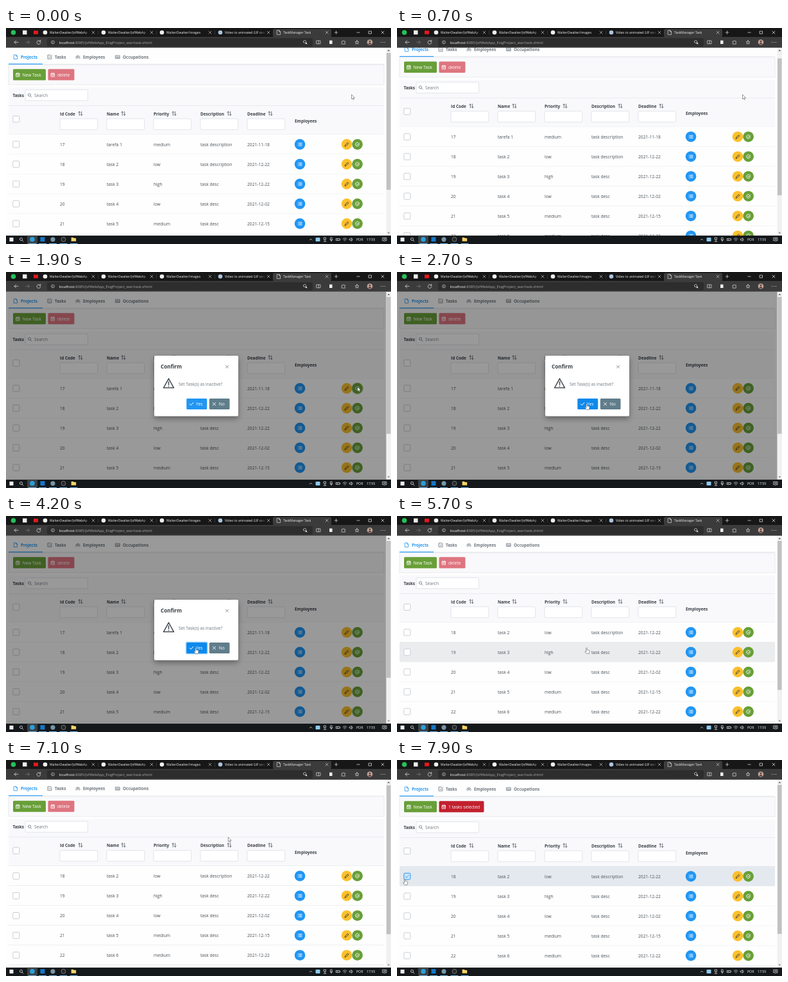
These frames come from a looping animation (600x338 px, 8 s). An HTML page:

```html
<!DOCTYPE html>
<html lang="en">
<head>
<meta charset="utf-8">
<title>Task table</title>
<style>
  html, body { margin: 0; width: 100%; height: 100%; overflow: hidden; background: #fff; }
  svg { display: block; width: 100vw; height: 100vh; }
  text { font-family: "Open Sans", "Noto Sans", sans-serif; white-space: pre; }
</style>
</head>
<body>
<svg viewBox="0 0 600 338" xmlns="http://www.w3.org/2000/svg">
  <defs>
    <linearGradient id="fade"><stop stop-color="#171717" stop-opacity="0"/><stop offset="1" stop-color="#171717"/></linearGradient>
    <filter id="shadow" x="-20%" y="-20%" width="140%" height="150%"><feDropShadow dx="0" dy="4" stdDeviation="4" flood-opacity=".35"/></filter>
  </defs>
  <g id="page"></g>
  <g id="chrome"></g>
  <g id="pointer"></g>
</svg>
<script>
const LOOP = 8000, STEP = 100;
const TOP = 30.8, BOTTOM = 324.8, ROW_TOP = 166.5, ROW_H = 31;
const INK = '#495057', DARK = '#383e44', MUTED = '#6c757d', LINE = '#e3e6ea', PANEL = '#f9f9fb';
const BLUE = '#2196f3', GREEN = '#689f38', AMBER = '#fbc02d';
const COLUMNS = [84, 157, 230, 303, 376];
const TASKS = [
  ['17', 'tarefa 1', 'medium', 'task description', '2021-11-18'],
  ['18', 'task 2', 'low', 'task description', '2021-12-22'],
  ['19', 'task 3', 'high', 'task desc', '2021-12-22'],
  ['20', 'task 4', 'low', 'task desc', '2021-12-02'],
  ['21', 'task 5', 'medium', 'task desc', '2021-12-15'],
  ['22', 'task 6', 'medium', 'task desc', '2021-12-22']
];

// SVG helpers
const rect = (x, y, w, h, fill, extra = '') =>
  `<rect x="${x}" y="${y}" width="${w}" height="${h}" fill="${fill}" ${extra}/>`;
const circle = (x, y, r, fill, extra = '') =>
  `<circle cx="${x}" cy="${y}" r="${r}" fill="${fill}" ${extra}/>`;
const text = (s, x, y, fill = INK, size = 6.7, extra = '') =>
  `<text x="${x}" y="${y}" fill="${fill}" font-size="${size}" ${extra}>${s}</text>`;
const bold = (s, x, y, fill = DARK, size = 6.45) => text(s, x, y, fill, size, 'font-weight="700"');
const icon = (d, x, y, color, width = .8, fill = 'none') =>
  `<path transform="translate(${x} ${y})" d="${d}" fill="${fill}" stroke="${color}" stroke-width="${width}" stroke-linecap="round" stroke-linejoin="round"/>`;
const input = (x, y, w, h) => rect(x, y, w, h, '#fff', 'rx="1.3" stroke="#ced4da" stroke-width=".6"');
const checkbox = y => rect(10.8, y - 5, 10, 10, '#fff', 'rx="1.3" stroke="#c3c9cf" stroke-width=".9"');

const ICONS = {
  file: 'M-2.4-3.3H.8L2.6-1.4V3.3H-2.4ZM.6-3.2V-1.2H2.5',
  checkBox: 'M3-.3V3H-3V-3H1.5M-1.5-.4L0 1.2 3.4-2.7',
  people: 'M-1.2-1A1.2 1.2 0 1 0 1.2-1 1.2 1.2 0 1 0-1.2-1M-2.3 2.7Q-2 .9 0 .9T2.3 2.7M-2.2-1.5Q-3.4-1-2.6.2L-3.5 1.6M2.2-1.5Q3.4-1 2.6.2L3.5 1.6',
  card: 'M-3.2-2.2H3.2V2.4H-3.2ZM-2-.4H-.3M-2 1H-.3M1-.3H2M.8 1.1H2.3',
  calendar: 'M-2.5-2H2.5V3H-2.5ZM-2.5-.4H2.5M-1.3-3V-1.5M1.3-3V-1.5M-1 1.4H1',
  search: 'M-2.6-.5A2.1 2.1 0 1 0 1.6-.5 2.1 2.1 0 1 0-2.6-.5M1 1.1L3 3.1',
  sort: 'M-1.7 3V-3M-3.2-1.5L-1.7-3-.2-1.5M1.7-3V3M.2 1.5L1.7 3 3.2 1.5',
  list: 'M-1.3-2H3M-1.3 0H3M-1.3 2H3M-2.9-2h.1M-2.9 0h.1M-2.9 2h.1',
  pencil: 'M-2.8 2.8L-2.2.8 1.5-2.9 2.9-1.5-.8 2.2Z',
  tick: 'M-2.8 0L-.8 2 2.9-2.2',
  checkCircle: 'M2.8-.2A2.9 2.9 0 1 1 1.2-2.6M-1.2-.3L.1 1 3-2.2',
  cross: 'M-2-2L2 2M2-2L-2 2',
  warning: 'M0-7.5L8 7H-8ZM0-2.5V2.2M0 4.4V4.6',
  left: 'M1-2L-1 0 1 2',
  right: 'M-1-2L1 0-1 2',
  star: 'M0-3L.9-.9 3-.8 1.4.6 1.9 2.8 0 1.6-1.9 2.8-1.4.6-3-.8-.9-.9Z',
  arrow: 'M0 0V6.6L1.6 5.3 2.7 7.7 3.7 7.3 2.7 4.9H4.7Z',
  hand: 'M-.7 .6Q0-.4.7 .6V3.4L3.8 4.2Q4.9 4.6 4.6 6L3.9 9.4H-.3L-2.6 6.2Q-2.6 5-.7 6.2Z'
};

// Motion
const easeOut = p => 1 - (1 - p) ** 2;
const easeInOut = p => p * p * (3 - 2 * p);
function track(keys, t, ease) {
  const next = keys.findIndex(k => k[0] > t);
  if (next === 0) return keys[0].slice(1);
  if (next < 0) return keys.at(-1).slice(1);
  const a = keys[next - 1], b = keys[next];
  const p = ease((t - a[0]) / (b[0] - a[0]));
  return a.slice(1).map((v, i) => v + (b[i + 1] - v) * p);
}
const SCROLL = [[50, 0], [350, 86.3], [420, 86.3], [865, 0], [6200, 0], [6560, 55.3], [6680, 55.3], [7150, 0]];
const POINTER = [[950, 538.5, 104.5], [1500, 548, 180], [1900, 548, 180], [2700, 295.5, 206],
  [5700, 295.5, 206], [6300, 398.5, 111], [6950, 398.5, 111], [7600, 12, 186]];
const DIALOG_OPEN = 1700, YES_CLICK = 4000, DIALOG_CLOSE = 5700, SELECT = 7800;

function tabMenu() {
  const tabs = [['Projects', 'file', 15, 23], ['Tasks', 'checkBox', 68, 76],
    ['Employees', 'people', 112, 120], ['Occupations', 'card', 174, 182]];
  return rect(4, 56.2, 585, .8, LINE) + rect(4, 55.8, 53, 1.2, BLUE) + tabs.map(([label, name, ix, x], i) => {
    const color = i ? MUTED : BLUE;
    return icon(ICONS[name], ix, 45.3, color) + bold(label, x, 47.8, color);
  }).join('');
}

function toolbar(selected) {
  const button = (x, w, fill, label) => rect(x, 64.3, w, 17.5, fill, 'rx="1.5"') +
    icon(ICONS.calendar, x + 7.5, 73.1, '#fff') + text(label, x + 14.5, 75.7, '#fff');
  return rect(4, 57.8, 585, 31, PANEL, `stroke="${LINE}" stroke-width=".8"`) +
    button(11, 51, GREEN, 'New Task') +
    (selected ? button(65.5, 70, '#c2202e', '1 tasks selected') : button(65.5, 41, '#de7580', 'delete'));
}

function tableHead() {
  const heads = [['Id Code', 116], ['Name', 183], ['Priority', 262], ['Description', 348], ['Deadline', 412]];
  return rect(4, 93, 585, 73.5, PANEL) + rect(4, 121, 585, .7, LINE) + rect(4, 166, 585, .7, LINE) +
    bold('Tasks', 10.5, 107.7) +
    input(30, 96.7, 97.5, 17) + icon(ICONS.search, 37, 105.2, MUTED) + text('Search', 44, 107.7, MUTED) +
    checkbox(142.5) +
    heads.map(([label, x], i) => bold(label, COLUMNS[i], 136.6) +
      icon(ICONS.sort, x, 133.8, INK) + input(COLUMNS[i], 142, 58.7, 17)).join('') +
    bold('Employees', 450, 147.6);
}

function tableRow(task, index, hovered, selected, focused) {
  const top = ROW_TOP + index * ROW_H, y = top + 15.6;
  const fill = selected ? '#e4e9ef' : hovered ? '#ebecee' : '#fefefe';
  const round = (x, color, name, ink) => circle(x, y, 8.3, color) + icon(ICONS[name], x, y, ink, .9);
  return rect(4, top, 585, ROW_H, fill) + rect(4, top + ROW_H - .6, 585, .7, LINE) +
    (selected
      ? rect(10.8, y - 5, 10, 10, '#cfe6fb', `rx="1.3" stroke="${BLUE}"`) + icon(ICONS.tick, 15.8, y, BLUE)
      : checkbox(y)) +
    task.map((s, i) => text(s, COLUMNS[i], y + 2.5)).join('') +
    (focused ? circle(547.6, y, 9.4, '#c5dfa8') : '') +
    round(458, BLUE, 'list', '#fff') + round(531, AMBER, 'pencil', '#333') + round(547.6, GREEN, 'checkCircle', '#fff');
}

function tableFoot(count) {
  const end = ROW_TOP + count * ROW_H, y = end + 15.5;
  const chevrons = [['left', 258.5], ['left', 262], ['left', 278], ['right', 314], ['right', 330.5], ['right', 334]];
  return rect(288.3, y - 8.3, 16.2, 16.6, '#e3f2fd', 'rx="1.3"') +
    text('1', 296.4, y + 2.5, INK, 6.7, 'text-anchor="middle"') +
    chevrons.map(([name, x]) => icon(ICONS[name], x, y, MUTED, .7)).join('') +
    rect(4, end + 29.5, 585, 27, PANEL, `stroke="${LINE}" stroke-width=".7"`) +
    bold(`In total there are ${count} tasks.`, 10.5, end + 45.7, DARK, 6.3);
}

function scrollbar(scroll, count) {
  const view = BOTTOM - TOP, height = view + 55.3 + (count - 5) * ROW_H, scale = 277 / height;
  return rect(592.5, TOP, 7.5, view, '#f1f1f1') +
    rect(593, 39 + scroll * scale, 6.5, view * scale, '#c1c1c1') +
    icon('M-1.6 .9L0-.9 1.6 .9Z', 596.3, 35, '#555', .2, '#555') +
    icon('M-1.6-.9L0 .9 1.6-.9Z', 596.3, 320.8, '#777', .2, '#777');
}

function dialog(opacity, hover, focus) {
  return rect(0, TOP, 592.5, BOTTOM - TOP, '#000', 'opacity=".4"') + `<g opacity="${opacity}">` +
    rect(231, 131, 131, 94.5, '#fff', 'rx="2" filter="url(#shadow)"') +
    bold('Confirm', 241, 151, DARK, 8.2) + icon(ICONS.cross, 344.5, 148.3, MUTED) +
    icon(ICONS.warning, 253.5, 174.3, INK, 1.6) +
    text('Set Task(s) as inactive?', 269, 177.6, MUTED, 6.6) +
    (focus ? rect(279.8, 196.4, 34.9, 20.2, '#a6d5fa', 'rx="2.5"') : '') +
    rect(281.3, 197.9, 31.9, 17.2, hover ? '#0d89ec' : BLUE, 'rx="1.5"') +
    icon(ICONS.tick, 289, 206.5, '#fff', 1) + text('Yes', 296, 209, '#fff') +
    rect(316.8, 197.9, 31.7, 17.2, '#607d8b', 'rx="1.5"') +
    icon(ICONS.cross, 324.5, 206.5, '#fff', 1) + text('No', 331.8, 209, '#fff') + '</g>';
}

function browserTabs() {
  const repo = 'WalterOwalter/';
  const titles = [repo + 'JsfWebAp', repo + 'JsfWebAp', repo + 'images', 'Video to animated GIF con', 'TaskManager Task'];
  return rect(0, 0, 600, 14, '#171717') + rect(416, 1.5, 91, 13, '#3b3b3b', 'rx="2"') +
    circle(11.5, 7, 3.8, '#25c15a') + rect(26, 3.7, 6.5, 6.5, '#eee') + rect(43, 4.2, 7, 5.5, '#e8171f') +
    titles.map((title, i) => {
      const x = 61 + 91 * i, active = i === 4;
      const mark = active ? icon(ICONS.file, x, 7, '#ddd', .7)
        : circle(x, 7, 3.3, i === 3 ? '#a9c4dc' : '#f2f2f2');
      return mark + text(title, x + 7, 9, '#f0f0f0', 5.1) +
        (active ? '' : rect(x + 60, 2, 12, 11, 'url(#fade)') + rect(x + 72, 2, 10, 11, '#171717') + rect(x + 82, 4, .5, 6.5, '#555')) +
        icon(ICONS.cross, x + 75, 7, '#ddd', .6);
    }).join('') +
    icon('M-2.4 0H2.4M0-2.4V2.4', 514.5, 7, '#ddd', .7) +
    icon('M-2.2 0H2.2', 549, 7, '#eee', .7) + icon('M-2-2H2V2H-2Z', 567.5, 7, '#eee', .7) + icon(ICONS.cross, 587, 7, '#eee', .7);
}

function addressBar() {
  const c = '#d8d8d8';
  return rect(0, 14, 600, TOP - 14, '#3b3b3b') + rect(64, 16, 414, 13, '#2d2d2d', 'rx="2"') +
    icon('M3 0H-3M-.4-2.6L-3 0-.4 2.6', 16, 22.3, c) + icon('M-3 0H3M.4-2.6L3 0 .4 2.6', 33.5, 22.3, '#777') +
    icon('M2.5-1.3A2.9 2.9 0 1 0 2.9 .5M2.7-3.2V-1.2H.7', 51, 22.3, c) +
    icon('M-2.5 0A2.5 2.5 0 1 0 2.5 0 2.5 2.5 0 1 0-2.5 0M0-.2V1.2M0-1.3V-1.2', 73, 22.3, c, .6) +
    text('<tspan fill="#fff">localhost</tspan>:8085/JsfWebApp_EsigProject_war/task.xhtml', 82.5, 24.6, '#a9a9a9', 5.8) +
    icon(ICONS.search, 466, 22, c, .7) + circle(468, 24, 1.2, c) +
    icon('M-3-2.4H3V2.4H-3ZM0-2.4V2.4', 487, 22.3, c, .7) + rect(504, 19.5, 4.5, 5.5, '#eee') +
    icon('M-2.4-1.6H-.8Q0-4 .8-1.6H2.4V0Q.6.6 2.4 1.4V2.8H-2.4Z', 526, 22.3, c, .7) +
    icon(ICONS.star, 547, 22.3, c, .7) +
    circle(567, 22.3, 4.3, '#b9a59b') + circle(567, 20.8, 1.4, '#6b3a35') + icon('M-2.4 2.4Q0-2.4 2.4 2.4Z', 567, 22.8, '#6b3a35', .3, '#6b3a35') +
    [584.5, 587.5, 590.5].map(x => circle(x, 22.3, .6, c)).join('');
}

function taskbar() {
  const c = '#e0e0e0', height = 338 - BOTTOM;
  return rect(0, BOTTOM, 600, height, '#14181b') + rect(33, BOTTOM, 16, height, '#3b4145') +
    rect(5.5, 328, 6, 6, '#f2f2f2') + icon(ICONS.search, 24, 331, c) +
    circle(41, 330.8, 3.8, '#2b9fd8') + rect(53.5, 327.2, 7, 7, '#1676c9') + circle(73, 330.8, 3.6, '#7795a8') +
    circle(89.5, 330.8, 3.5, '#25282b', 'stroke="#aaa" stroke-width=".6"') +
    icon('M-3.5-2.8H-.6L.3-1.8H3.5V2.8H-3.5Z', 105.5, 330.8, '#f4c64c', .4, '#f8d66a') +
    [41, 57, 73, 89.5, 105.5].map(x => rect(x - 6, 337, 12, 1, '#76b9ed')).join('') +
    icon('M-2 1L0-1 2 1', 475, 331, c, .7) + rect(482.5, 328, 7, 6, '#8cc9f0', 'rx="1"') +
    icon('M-1.5-3H1.5V0H-1.5ZM0 0V3M-2 3H2', 497, 331, c, .7) +
    icon('M-1-3H1V.5H-1ZM-2 0Q0 4 2 0M0 2V3', 507, 331, c, .7) +
    icon('M-3-1.5H2.5V1.5H-3ZM3.2-.5V.5M-2 0H0', 517.5, 331, c, .7) +
    icon('M-3-.8Q0-3.6 3-.8M-1.7.8Q0-.8 1.7.8M0 2.4V2.5', 528, 331, c, .7) +
    icon('M-2.5-1H-1.3L.3-2.5V2.5L-1.3 1H-2.5ZM1.6-1.5Q2.8 0 1.6 1.5', 538, 331, c, .7) +
    text('POR', 546, 333, '#fff', 5.2) + text('17:55', 562, 333, '#fff', 5.2) +
    icon('M-3-2.8H3V1.8H1L0 3-1 1.8H-3ZM-1.6-1.2H1.6M-1.6.3H1.6', 590, 331, c, .7);
}

const [page, chrome, pointer] = ['page', 'chrome', 'pointer'].map(id => document.getElementById(id));
chrome.innerHTML = browserTabs() + addressBar() + taskbar();

function draw(t) {
  const [scroll] = track(SCROLL, t, easeOut);
  const [x, y] = track(POINTER, t, easeInOut);
  const tasks = t < DIALOG_CLOSE ? TASKS : TASKS.slice(1);
  const open = t >= DIALOG_OPEN && t < DIALOG_CLOSE;
  const selected = t >= SELECT;
  const hoverRow = open ? -1 : Math.floor((y + scroll - ROW_TOP) / ROW_H);
  const onYes = open && x > 281 && x < 313 && y > 198 && y < 215;
  const focused = t >= DIALOG_OPEN && t < 2100;

  page.innerHTML = rect(0, TOP, 600, BOTTOM - TOP, '#fefefe') +
    `<g transform="translate(0 ${-scroll})">` + tabMenu() + toolbar(selected) + tableHead() +
    tasks.map((task, i) => tableRow(task, i, i === hoverRow, selected && i === 0, focused && i === 0)).join('') +
    tableFoot(tasks.length) + '</g>' + scrollbar(scroll, tasks.length) +
    (open ? dialog(Math.min(1, (t - DIALOG_OPEN + 50) / 150), onYes, t >= YES_CLICK) : '');
  pointer.innerHTML = icon(onYes || hoverRow >= 0 ? ICONS.hand : ICONS.arrow, x, y, '#555', .6, '#fff');
}

let shown = -1;
function tick() {
  const t = Math.floor(performance.now() % LOOP / STEP) * STEP;
  if (t !== shown) draw(shown = t);
  requestAnimationFrame(tick);
}
tick();
</script>
</body>
</html>
```
